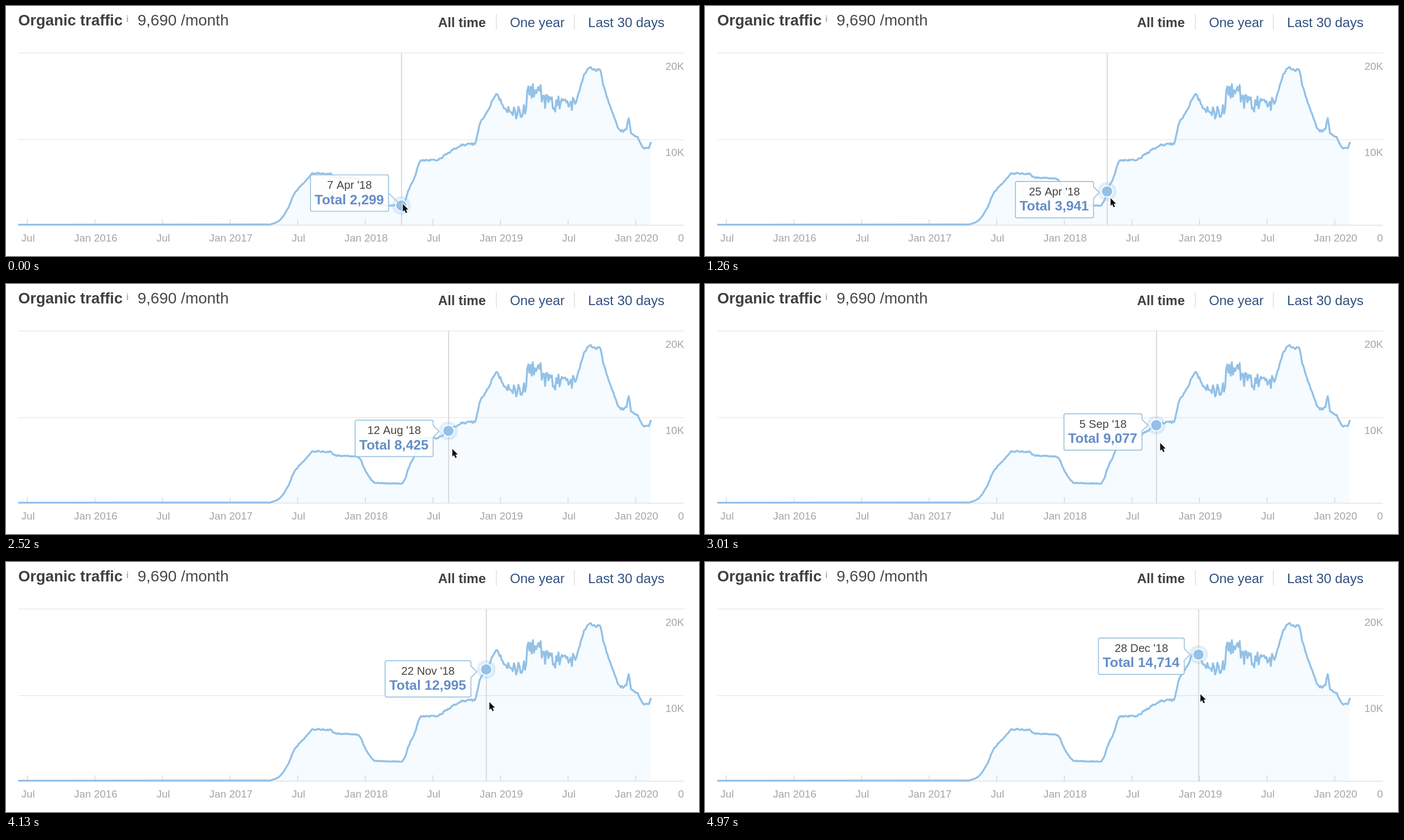
Recreate the animation shown at these times as an HTML page with a canvas. Size 1243 by 450 pixels, loop 5.04 s.

```html
<!DOCTYPE html>
<html lang="en">
<head>
<meta charset="utf-8">
<title>Organic traffic</title>
<style>
  html, body { margin: 0; width: 100%; height: 100%; overflow: hidden; background: #fff; }
  canvas { display: block; width: 1243px; height: 450px; }
</style>
</head>
<body>
<canvas id="stage"></canvas>
<script>
const LOOP = 5040, STEP = 70, LAG = 90;
const BASE = 394.8, SCALE = 0.0155;
const BLUE = '#93c1e7', GREY = '#a5a5a5', INK = '#404040', LINK = '#2f5080';
const FAMILY = '"Liberation Sans", Arial, sans-serif';
const canvas = document.getElementById('stage');
const ratio = window.devicePixelRatio || 1;
canvas.width = 1243 * ratio;
canvas.height = 450 * ratio;
const ctx = canvas.getContext('2d');
ctx.scale(ratio, ratio);

// Monotone cubic through [x, y] points
function spline(points) {
  const last = points.length - 1;
  const slope = i => (points[i + 1][1] - points[i][1]) / (points[i + 1][0] - points[i][0]);
  const tangent = i => {
    if (i === 0) return slope(0);
    if (i === last) return slope(last - 1);
    const a = slope(i - 1), b = slope(i);
    return a * b <= 0 ? 0 : 2 * a * b / (a + b);
  };
  return x => {
    let i = 0;
    while (i < last - 1 && x > points[i + 1][0]) i++;
    const [x0, y0] = points[i], [x1, y1] = points[i + 1];
    const h = x1 - x0, s = (x - x0) / h, r = 1 - s;
    return y0 * (1 + 2 * s) * r * r + y1 * (3 - 2 * s) * s * s
      + h * s * r * (tangent(i) * r - tangent(i + 1) * s);
  };
}

// Hover readings: time, day since 7 April 2018, total
const readings = [
  [0, 0, 2299], [1260, 18, 3941], [1890, 68, 7540], [2520, 127, 8425],
  [3570, 177, 9382], [4130, 229, 12995], [4970, 265, 14714]
];
const dayX = day => 709.2 + day * 0.664;
const dayAt = spline(readings);

const trend = spline([
  [22, 393.6], [469, 393.6], [488, 388], [506, 364], [517, 338], [535, 318],
  [552, 301], [580, 302], [590, 308], [633, 312], [643, 333], [663, 358],
  [715, 353], [733, 308], [744, 279], [773, 277], [820, 250], [841, 248],
  [850, 211], [882, 158], [900, 190], [928, 191], [939, 154], [955, 149],
  [970, 175], [1018, 178], [1036, 128], [1043, 113], [1064, 115], [1072, 144],
  [1086, 188], [1103, 225], [1113, 222], [1117, 200], [1121, 231], [1133, 236],
  [1143, 256], [1154, 254], [1157, 243],
  ...readings.map(([, day, total]) => [dayX(day), BASE - total * SCALE])
].sort((a, b) => a[0] - b[0]));

let seed = 29;
const random = () => (seed = seed * 16807 % 2147483647) / 2147483647;

// Daily jitter grows with traffic and peaks in one choppy season.
function buildCurve() {
  const path = new Path2D();
  path.moveTo(22, trend(22));
  for (let x = 469; x <= 1157; x += 2) {
    const y = trend(x);
    const rough = x > 900 && x < 1022 ? 15 : 0.3 + (BASE - y) * 0.011;
    path.lineTo(x, y + (random() * 2 - 1) * rough);
  }
  return path;
}
const curve = buildCurve();
const area = new Path2D(curve);
area.lineTo(1157, BASE);
area.lineTo(22, BASE);

function text(str, x, y, size, color, align = 'left', weight = 'normal') {
  ctx.font = `${weight} ${size}px ${FAMILY}`;
  ctx.textAlign = align;
  ctx.fillStyle = color;
  ctx.fillText(str, x, y);
}

function line(x0, y0, x1, y1, color) {
  ctx.beginPath();
  ctx.moveTo(x0, y0);
  ctx.lineTo(x1, y1);
  ctx.strokeStyle = color;
  ctx.lineWidth = 1.5;
  ctx.stroke();
}

function disc(x, y, r, color) {
  ctx.beginPath();
  ctx.arc(x, y, r, 0, 2 * Math.PI);
  ctx.fillStyle = color;
  ctx.fill();
}

function drawHeader() {
  text('Organic traffic', 22, 35, 27.4, INK, 'left', 'bold');
  text('i', 215.5, 29, 17, '#b5b5b5', 'left', 'bold');
  text('9,690 /month', 236, 35, 28, '#484848');
  text('All time', 775, 37.5, 23.7, INK, 'left', 'bold');
  text('One year', 904, 37.5, 23.8, LINK);
  text('Last 30 days', 1044, 37.5, 24.2, LINK);
  line(879.5, 15, 879.5, 42, '#dcdcdc');
  line(1019.5, 15, 1019.5, 42, '#dcdcdc');
}

function drawChart() {
  ctx.fillStyle = '#f5fbff';
  ctx.fill(area);
  line(22, 84.5, 1216, 84.5, '#eaeaea');
  line(22, 240.5, 1216, 240.5, 'rgba(0,0,0,.085)');
  line(22, 394.5, 1216, 394.5, '#dde3e8');
  for (let i = 0; i < 10; i++) {
    const x = 38.3 + i * 121.25;
    line(x, 384, x, 395, '#d3dae0');
    text(i % 2 ? 'Jan ' + (2016 + (i - 1) / 2) : 'Jul', x + 1.3, 424, 18.9, GREY, 'center');
  }
  text('20K', 1216.5, 114.5, 19, GREY, 'right');
  text('10K', 1216.5, 269.5, 19, GREY, 'right');
  text('0', 1216, 424, 19, GREY, 'right');

  ctx.strokeStyle = BLUE;
  ctx.lineWidth = 3.4;
  ctx.lineJoin = 'round';
  ctx.stroke(curve);
}

function drawTooltip(right, top, x, y, day, total) {
  const width = total > 9999 ? 154 : 140, height = 65.5;
  const left = right - width, bottom = top + height, r = 3;
  const tip = Math.max(y, top + 20);
  ctx.beginPath();
  ctx.moveTo(left + r, top);
  ctx.arcTo(right, top, right, bottom, r);
  if (y > bottom - 14) {
    // The arrow narrows to a leader line when the marker is too low.
    ctx.lineTo(right, top + height / 2);
    ctx.lineTo(x, y);
    ctx.lineTo(right, top + height / 2);
  } else {
    ctx.lineTo(right, tip - 10.5);
    ctx.lineTo(right + 10.5, tip);
    ctx.lineTo(right, tip + 10.5);
  }
  ctx.arcTo(right, bottom, left, bottom, r);
  ctx.arcTo(left, bottom, left, top, r);
  ctx.arcTo(left, top, right, top, r);
  ctx.closePath();
  ctx.fillStyle = 'rgba(255,255,255,.87)';
  ctx.fill();
  ctx.strokeStyle = '#9bc3e0';
  ctx.lineWidth = 1.7;
  ctx.stroke();

  const date = new Date(Date.UTC(2018, 3, 7 + day));
  const month = date.toLocaleString('en-US', { month: 'short', timeZone: 'UTC' });
  const middle = left + width / 2;
  text(`${date.getUTCDate()} ${month} '18`, middle, top + 25, 20.2, '#444', 'center');
  text('Total ' + total.toLocaleString('en-US'), middle - 0.5, top + 52.5, 24.4, '#648dc6', 'center', 'bold');
}

const arrow = new Path2D('M0 0V14L3 11.3L5.4 16.5L8 15.3L5.7 10.3L9.8 10Z');

function drawPointer(x, y) {
  ctx.save();
  ctx.translate(x, y);
  ctx.strokeStyle = '#fff';
  ctx.lineWidth = 2.4;
  ctx.stroke(arrow);
  ctx.fillStyle = '#111';
  ctx.fill(arrow);
  ctx.restore();
}

function draw(now) {
  const t = Math.floor(now % LOOP / STEP) * STEP;
  const day = Math.round(dayAt(t));
  const x = dayX(day), y = trend(x);
  const total = Math.round((BASE - y) / SCALE);

  // The box trails the marker, after first dropping into place.
  const trailX = dayX(dayAt(Math.max(0, t - LAG)));
  const drop = 25 * Math.max(0, 1 - t / 350) ** 2;
  const top = Math.min(trend(trailX) - 22, 329) - drop;

  // The pointer climbs a straight line, leading the marker in mid-sweep.
  const pointerX = x + 2.5 + 4.5 * Math.sqrt(Math.sin(Math.PI * t / LOOP));
  const pointerY = 356 - 0.67 * (pointerX - 712);

  ctx.fillStyle = '#fff';
  ctx.fillRect(0, 0, 1243, 450);
  drawHeader();
  drawChart();
  line(x + 0.3, 85, x + 0.3, 394, '#cfcfcf');
  disc(x, y, 17, 'rgba(147,194,233,.27)');
  disc(x, y, 11, '#fff');
  disc(x, y, 9.3, BLUE);
  drawTooltip(trailX - 23, top, x, y, day, total);
  drawPointer(pointerX, pointerY);
}

const start = performance.now();
function tick() {
  draw(performance.now() - start);
  requestAnimationFrame(tick);
}
tick();
</script>
</body>
</html>
```
